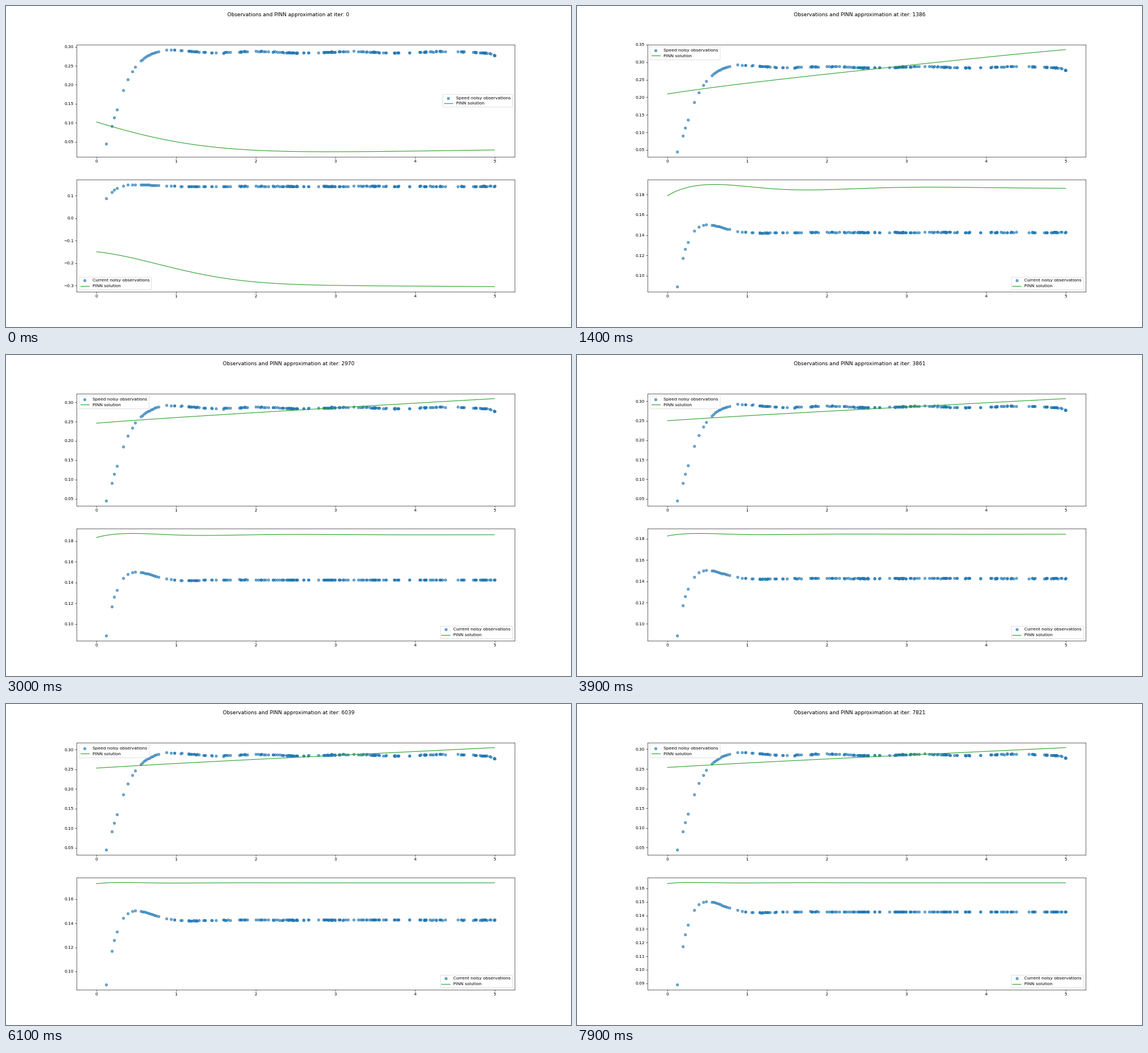
Recreate the animation shown at these times as a matplotlib script. Size 993 by 564 pixels, loop 8000 ms.

```python
import numpy as np
import matplotlib.pyplot as plt
from matplotlib.animation import FuncAnimation

W, H, DPI = 993, 564, 993 / 18.5
FRAMES, STEP = 80, 99
WARMUP = 7
GAPS = [2.56, 3.68, 4.0, 4.49, 4.69]
rng = np.random.default_rng(4)
exp, sin, cos = np.exp, np.sin, np.cos


def sample_times():
    early = [.1215, .189, .2215, .2535, .336, .393, .4465, .486]
    rise = np.linspace(.555, .775, 11)
    steady = rng.uniform(.9, 5, 190)
    near = np.abs(steady[:, None] - GAPS).min(axis=1) < .04
    return np.concatenate([early, rise, [.88], steady[~near], [4.995, 5]])


def speed_data(t):
    """Damped step response with slow drift and noise once it settles."""
    v = .286 * (1 - exp(-4.2 * t) * (cos(3.5 * t) + 1.2 * sin(3.5 * t)))
    v -= .0038 * sin(8.4 * (t - .49)) * (t < .85)
    v += .002 * np.clip(2 * t - 2, 0, 1) * cos(2 * np.pi * (t - 2) / 1.2)
    v -= .0075 * exp((t - 5) / .04)
    return v + 5e-4 * rng.normal(size=t.size) * (t > .9)


def current_data(t):
    ring = .45 * exp(-3.76 * t) * sin(4.6 * (.3 - t))
    v = .1428 * (1 - ring - .776 * exp(-12.6 * t))
    return v + 8e-5 * rng.normal(size=t.size) * (t > .9)


def learn(start, fitted, n):
    """Leave the untrained curve within the first few updates."""
    w = exp(-(n / 2.5) ** 2)
    return w * start + (1 - w) * fitted


def speed_fit(t, n):
    start = .0134 + .003 * t + .0886 * exp(-.75 * t - .22 * t**2)
    excess = .0327 * exp(-max(n - WARMUP, 0) / 7.7)
    slope = .0109 - 1.8e-5 * n + excess
    fitted = .2813 + slope * (t - 2.6 - .3 * exp(-t))
    fitted -= .2 * excess * (t / 2.5 - 1) ** 4
    return learn(start, fitted, n)


def current_fit(t, n):
    start = -.295 - .002 * t + .1453 * exp(-.25 * t - .45 * t**2)
    level = np.interp(n, [7, 22, 39, 50, 79], [.1855, .1878, .1842, .1794, .1641])
    amp = .04 + .96 * exp(-max(n - WARMUP, 0) / 13.5)
    u = t * amp ** -.25
    wave = sin(np.pi * (2 * np.sqrt(u + .47) - 1.7))
    fitted = level + amp * wave * (.0078 * exp(-.45 * u) + .0068 * exp(-6 * u))
    return learn(start, fitted, n)


times = sample_times()
grid = np.linspace(0, 5, 500)
fig, axes = plt.subplots(2, 1, dpi=DPI,
                         figsize=((W + 1e-6) / DPI, (H + 1e-6) / DPI))
title = fig.suptitle("")


def panel(ax, name, data, fit):
    ax.scatter(times, data, alpha=.65, label=f"{name} noisy observations")
    line, = ax.plot(grid, fit(grid, 0), color="tab:green", label="PINN solution")
    ax.set_xlim(-.25, 5.25)
    ax.legend(loc="best")
    return ax, line, data, fit


panels = [panel(axes[0], "Speed", speed_data(times), speed_fit),
          panel(axes[1], "Current", current_data(times), current_fit)]


def update(n):
    title.set_text(f"Observations and PINN approximation at iter: {n * STEP}")
    for ax, line, data, fit in panels:
        y = fit(grid, n)
        line.set_ydata(y)
        lo, hi = min(y.min(), data.min()), max(y.max(), data.max())
        pad = .05 * (hi - lo)
        ax.set_ylim(lo - pad, hi + pad)
    return [title] + [p[1] for p in panels]


anim = FuncAnimation(fig, update, frames=FRAMES, interval=100, repeat=True,
                     repeat_delay=0, blit=False)
plt.show()
```
